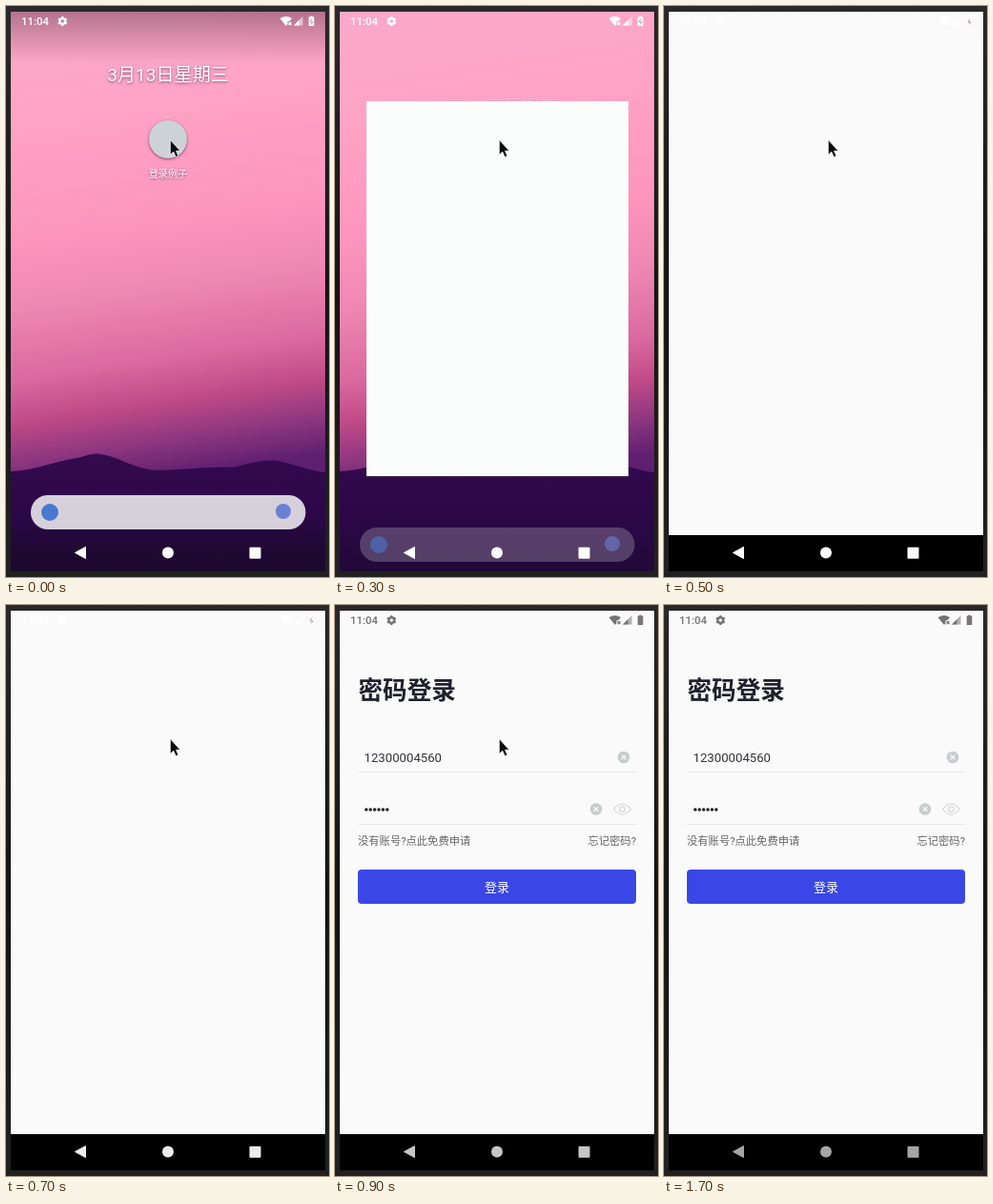
Animation, 339 px wide and 600 px high, one loop 1800 ms. Source, as an HTML page with a canvas:

```html
<!DOCTYPE html>
<html lang="zh-CN">
<head>
<meta charset="utf-8">
<style>
  html, body { margin: 0; width: 100%; height: 100%; overflow: hidden; background: #1d1c1d; }
  canvas { display: block; }
</style>
</head>
<body>
<canvas id="stage" width="339" height="600"></canvas>
<script>
const ctx = document.getElementById('stage').getContext('2d');
const LOOP = 1800, STEP = 100;
const FONT = 'Roboto, "Noto Sans CJK SC", "Noto Sans CJK", sans-serif';
const SCREEN = [5, 6, 330, 588];

const gray = v => `rgb(${v},${v},${v})`;
const ramp = (t, from, to, a, b) => a + (b - a) * Math.min(1, Math.max(0, (t - from) / (to - from)));

function rect(x, y, w, h, fill, radius = 0) {
  ctx.fillStyle = fill;
  ctx.beginPath();
  ctx.roundRect(x, y, w, h, radius);
  ctx.fill();
}

function circle(x, y, r, fill) {
  ctx.fillStyle = fill;
  ctx.beginPath();
  ctx.arc(x, y, r, 0, Math.PI * 2);
  ctx.fill();
}

function shape(d, fill, stroke, width = 1) {
  const path = new Path2D(d);
  if (fill) { ctx.fillStyle = fill; ctx.fill(path); }
  if (stroke) { ctx.strokeStyle = stroke; ctx.lineWidth = width; ctx.stroke(path); }
}

function text(str, x, y, size, fill, { align = 'left', weight = 400 } = {}) {
  ctx.font = `${weight} ${size}px ${FONT}`;
  ctx.textAlign = align;
  ctx.fillStyle = fill;
  ctx.fillText(str, x, y);
}

function gradient(x0, y0, x1, y1, stops) {
  const g = ctx.createLinearGradient(x0, y0, x1, y1);
  stops.forEach(([at, color]) => g.addColorStop(at, color));
  return g;
}

function faded(alpha, draw) {
  ctx.save();
  ctx.globalAlpha = alpha;
  draw();
  ctx.restore();
}

function shadowed(draw) {
  ctx.save();
  ctx.shadowColor = 'rgba(60,20,50,.65)';
  ctx.shadowBlur = 3;
  ctx.shadowOffsetY = 1;
  draw();
  ctx.restore();
}

function wallpaper() {
  rect(...SCREEN, gradient(130, 6, 200, 490, [
    [0, '#fca8c8'], [.2, '#ffa3c4'], [.45, '#fd95bd'], [.6, '#ee87b2'],
    [.75, '#da699f'], [.84, '#c04a87'], [.92, '#8f3780'], [1, '#5f1f70']
  ]));
  shape('M5 489C30 488 50 479 68 476C82 474 88 470 96 470.5C115 472 130 484 152 487.5' +
    'C175 489 200 484 240 484.5C256 480 268 477 282 477.5C300 480 315 488 335 490V594H5Z',
    gradient(0, 470, 0, 594, [[0, '#340a4f'], [.5, '#2c0748'], [1, '#210a38']]));
}

function scrims() {
  rect(5, 6, 330, 54, gradient(0, 6, 0, 60, [
    [0, 'rgba(80,40,60,.42)'], [.4, 'rgba(80,40,60,.25)'], [1, 'rgba(80,40,60,0)']
  ]));
  rect(5, 540, 330, 54, gradient(0, 540, 0, 594, [[0, 'rgba(20,8,30,0)'], [1, 'rgba(20,8,30,.5)']]));
}

function searchBar(y, barAlpha, iconAlpha) {
  faded(barAlpha, () => rect(26, y, 288.5, 36, '#d6d0db', 18));
  faded(iconAlpha, () => {
    circle(46, y + 18, 9, '#4a78d0');
    circle(291, y + 17, 8, '#6a80d2');
  });
}

function launcher(t) {
  wallpaper();
  const leaving = t >= 300, shift = leaving ? 34 : 0;
  if (!leaving) scrims();
  faded(leaving ? .3 : 1, () => shadowed(() =>
    text('3月13日星期三', 170, 79 + shift, 19.1, '#fff', { align: 'center' })));
  searchBar(514 + shift, leaving ? .27 : 1, leaving ? .6 : 1);
  if (leaving) return;
  shadowed(() => {
    circle(170, 140, 20 + t / 100, '#cdd2d8');
    text('登录例子', 170, 180, 10.2, '#fff', { align: 'center' });
  });
}

function statusBar(color) {
  text('11:04', 16, 20, 11.4, color, { weight: 500 });

  ctx.strokeStyle = color;
  ctx.lineWidth = 2.4;
  ctx.beginPath();
  ctx.arc(59.3, 16, 2.9, 0, Math.PI * 2);
  ctx.stroke();
  for (let i = 0; i < 6; i++) {
    const a = i * Math.PI / 3 + Math.PI / 6;
    circle(59.3 + 4 * Math.cos(a), 16 + 4 * Math.sin(a), 1.2, color);
  }

  shape('M287.5 13Q294 9 300 13L297.5 16H295.5V19L294 21Z', color);
  shape('M296.5 17L299.5 20M299.5 17L296.5 20', null, color, 1.1);
  faded(.55, () => shape('M302 20.5L311.5 11V20.5Z', color));
  shape('M302 20.5L307.5 15V20.5Z', color);
  shape('M319.3 10.5H321.7V11.5H323.3V21H317.7V11.5H319.3Z', color);
  shape('M321 13.5L319 16.8H322L320 19.5', null, 'rgba(150,120,135,.8)', .9);
}

function navButtons(color) {
  shape('M72.5 574.5L83.5 568.5V580.5Z', color, color, 1);
  circle(170, 574.5, 6, color);
  rect(255.5, 568.7, 12, 12, color, 1);
}

function clearButton(x, y) {
  circle(x, y, 6.3, '#c9cccd');
  shape(`M${x - 2.3} ${y - 2.3}l4.6 4.6m0 -4.6l-4.6 4.6`, null, '#fafafa', 1.3);
}

function loginForm() {
  text('密码登录', 24.5, 98.5, 25.6, '#20202e', { weight: 700 });

  text('12300004560', 30.5, 165, 13.2, '#35323c');
  clearButton(303, 160);
  rect(24, 175, 292, 1, '#e9e9e9');

  for (let i = 0; i < 6; i++) circle(32.8 + i * 4.4, 215, 1.75, '#222');
  clearButton(274, 214.5);
  shape('M292.5 214.5Q301.5 203.5 310.5 214.5Q301.5 225.5 292.5 214.5Z', null, '#d0d2d3', 1.1);
  ctx.beginPath();
  ctx.arc(301.5, 214.5, 2.8, 0, Math.PI * 2);
  ctx.stroke();
  rect(24, 230, 292, 1, '#e9e9e9');

  text('没有账号?点此免费申请', 24, 252, 11.3, '#666');
  text('忘记密码?', 316, 252, 11.3, '#666', { align: 'right' });
  rect(24, 278, 292, 36, '#3a47e6', 4);
  text('登录', 170, 301, 13, '#fff', { align: 'center' });
}

function app(t) {
  const settling = t < 500;
  if (settling) wallpaper();
  if (settling) rect(6, 8, 328.5, 547, '#fafafa');
  else rect(5, 6, 330, 550, '#fafafa');
  rect(5, settling ? 555 : 556, 330, settling ? 37 : 38, '#000');
  if (t >= 800) loginForm();
  statusBar(gray(Math.round(ramp(t, 700, 900, 255, 115))));
  const dim = t < 900 ? ramp(t, 600, 900, 255, 198) : ramp(t, 900, 1200, 198, 165);
  navButtons(gray(Math.round(dim)));
}

function openingWindow() {
  rect(33, 100, 275, 395.5, '#3a2040');
  rect(33, 100, 275, 394, '#fafdfc');
}

function cursor() {
  shape('M172.3 140.5V156.5L175.8 153.3L178.2 158.8L181 157.6L178.6 152.3H183Z', '#0c0c0c', '#fff', .8);
}

function render(t) {
  rect(0, 0, 339, 600, gradient(0, 0, 0, 600, [[0, '#2b292a'], [.5, '#151515'], [1, '#222122']]));
  if (t < 400) {
    launcher(t);
    if (t >= 300) openingWindow();
    statusBar('#fff');
    navButtons('#fff');
  } else {
    app(t);
  }
  if (t < 1300) cursor();
}

function tick() {
  const t = performance.now() % LOOP;
  render(Math.floor(t / STEP) * STEP);
  requestAnimationFrame(tick);
}
tick();
</script>
</body>
</html>
```
